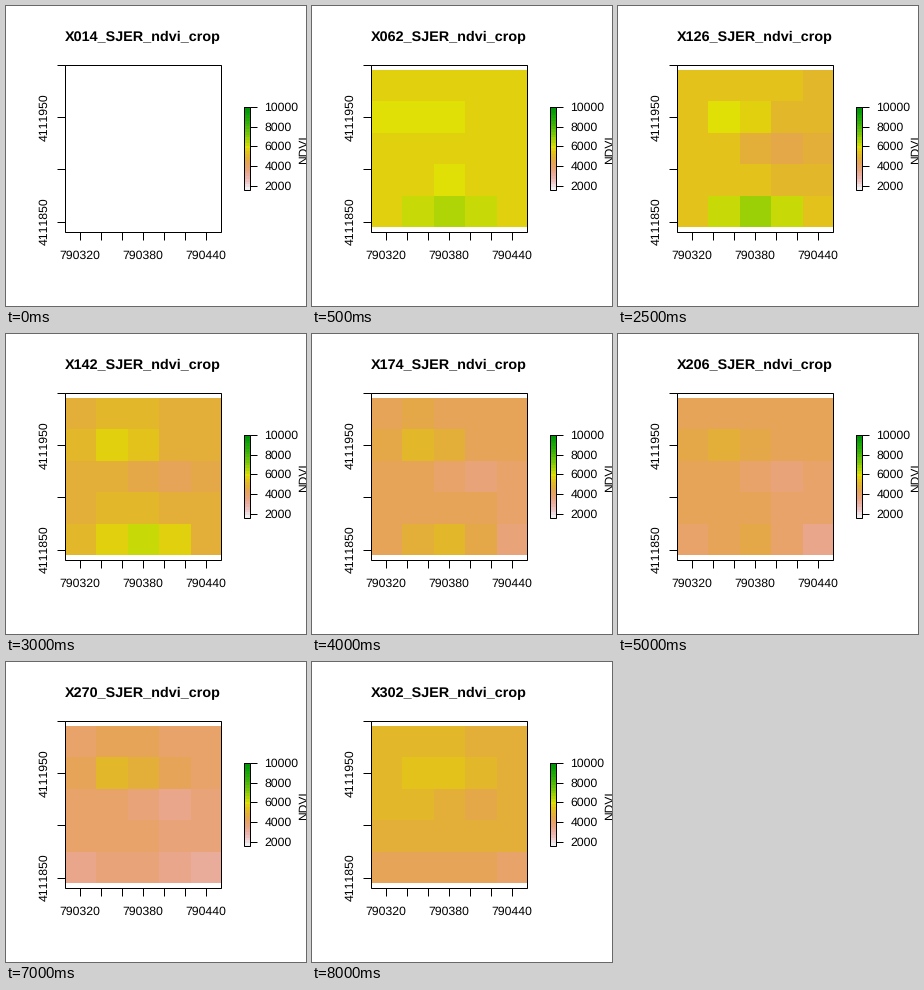
Recreate the animation shown at these times as a matplotlib script. Size 300 by 300 pixels, loop 8.5 s.

```python
import colorsys

import matplotlib.pyplot as plt
import numpy as np
from matplotlib.animation import FuncAnimation
from matplotlib.patches import Rectangle

SIZE = 300
DPI = 72  # one point equals one pixel
LEVELS = 30
plt.rcParams["font.family"] = "Liberation Sans"
plt.rcParams["text.hinting"] = "none"
plt.rcParams["text.kerning_factor"] = 6  # evenly spaced digits

BOX = (59, 59, 215, 226)
BAR = (238, 101, 244, 184)
DAYS = [14, 62, *range(78, 303, 16)]


def terrain(level):
    """Terrain colour for a level: near-white at 0, yellow midway, green on top."""
    half = LEVELS // 2
    if level < half:
        t = (half - level) / half
        hue, sat, val = (1 - t) / 6, 1 - t, 0.9 + 0.05 * t
    else:
        t = (level - half) / (half - 1)
        hue, sat, val = (1 + t) / 6, 1, 0.9 - 0.25 * t
    r, g, b = colorsys.hsv_to_rgb(hue, sat, val)
    return r ** 1.22, g ** 1.22, max(b ** 1.05, 0.03)


PALETTE = np.array([terrain(i) for i in range(LEVELS)])

# Vegetation model: a seasonal base level plus soft patches,
# each given by its strength on a few days of the year.
KEY_DAYS = [62, 94, 126, 174, 238, 270, 302]
BASE = [14, 14.8, 12.4, 9, 8.4, 8, 11.4]
PATCHES = {  # (row, column): strength
    (1, 1.4): [1.6, 1.6, 2.4, 3, 1.8, 4, 2],
    (4, 2): [2.8, 2.8, 5.6, 3, 0.5, 0, -1.5],
    (2, 3): [0, 0, -2.8, -2, -1.3, -2, -1],
    (4, 0): [0, 0, 0, 0, -2.4, -2, -2.4],
    (4, 4): [0, 0, 0, -2, -3, -3, -2.8],
}


def levels_on(day):
    rows, cols = np.mgrid[:5, :5]
    grid = np.full((5, 5), np.interp(day, KEY_DAYS, BASE))
    for (row, col), strength in PATCHES.items():
        dist = ((rows - row) / 0.55) ** 2 + ((cols - col) / 0.95) ** 2
        grid += np.interp(day, KEY_DAYS, strength) * np.exp(-dist / 2)
    return np.rint(grid).astype(int)


fig = plt.figure(figsize=(SIZE / DPI, SIZE / DPI), dpi=DPI, facecolor="white")
ax = fig.add_axes([0, 0, 1, 1])
ax.axis("off")


def line(x0, y0, x1, y1):
    ax.plot([x0, x1], [y0, y1], color="black", lw=1,
            solid_capstyle="butt", zorder=3)


def frame(x0, y0, x1, y1):
    ax.add_patch(Rectangle((x0, y0), x1 - x0, y1 - y0, fill=False,
                           ec="black", lw=1, joinstyle="miter", zorder=3))


def label(x, y, text, size=12.2, ha="center", **kw):
    return ax.text(x, y, text, fontsize=size, ha=ha, va="baseline",
                   rotation_mode="anchor", color="black", zorder=4, **kw)


def image(pixels, x0, y0, x1, y1):
    return ax.imshow(pixels, extent=(x0, x1, y1, y0), aspect="auto",
                     interpolation="nearest", zorder=1)


raster = image(np.ones((5, 5, 3)), 59, 65, 216, 221.4)
image(PALETTE[::-1, None, :], *BAR)
frame(*BOX)
frame(*BAR)

for i in range(7):
    x = 74.3 + 20.92 * i
    line(x, 226, x, 234)
    if i % 3 == 0:
        label(x, 253, str(790320 + 20 * i))

for i in range(4):
    y = 59 + 52.2 * i
    line(51, y, 59, y)
    if i % 2:
        label(42, y, str(4112000 - 50 * i), rotation=90)

for i in range(5):
    y = 101 + 19.65 * i
    line(244, y, 251, y)
    label(258.3, y + 4, str(10000 - 2000 * i), ha="left")

label(301, 143.5, "NDVI", size=12, rotation=90)
title = label(137.3, 35, "", size=14.4, weight="bold")

ax.set_xlim(0, SIZE)
ax.set_ylim(SIZE, 0)


def update(n):
    day = DAYS[n]
    title.set_text(f"X{day:03d}_SJER_ndvi_crop")
    raster.set_visible(n > 0)  # the first day holds no data
    if n > 0:
        raster.set_data(PALETTE[levels_on(day)])
    return raster, title


anim = FuncAnimation(fig, update, frames=len(DAYS), interval=500,
                     repeat=True, repeat_delay=0)
plt.show()
```
